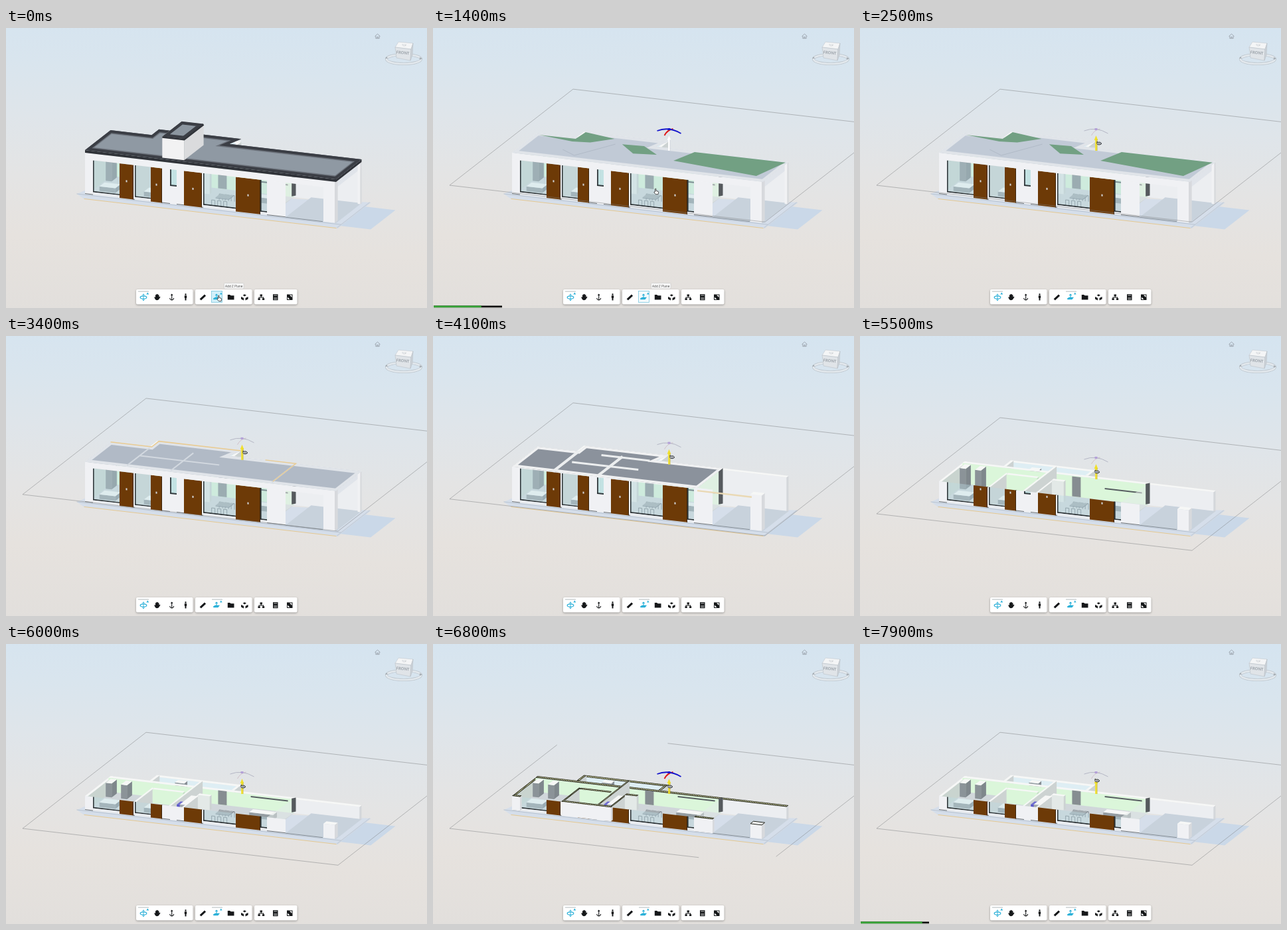
An HTML page with a canvas for the animation above (8000 ms loop, 634 by 422 pixels).

```html
<!DOCTYPE html>
<html lang="en">
<head>
<meta charset="utf-8">
<title>House section plane</title>
<style>
html, body { margin: 0; width: 634px; height: 422px; overflow: hidden; }
body {
  position: relative;
  background: linear-gradient(183deg, #d5e4f0 0%, #d9e5ee 18%, #dfe5ea 36%, #e4e4e4 56%, #e6e2de 76%, #e2dfdc 100%);
}
canvas, svg { position: absolute; left: 0; top: 0; width: 634px; height: 422px; }
text { font-family: "Open Sans", "Noto Sans", sans-serif; }
.bar { fill: #fff; filter: drop-shadow(0 1px 1.5px #0005); }
.blue { stroke: #2bb0d8; fill: none; }
.ink { fill: #16181a; }
.line { stroke: #16181a; fill: none; stroke-width: 1.1; }
</style>
</head>
<body>
<canvas id="view" width="634" height="422"></canvas>
<svg viewBox="0 0 634 422">
  <!-- view cube -->
  <path d="M555.5 12.500l4-3.500 4 3.500M556.800 12v3.700h5.400V12M558.700 15.700v-2.300h1.600v2.300" fill="none" stroke="#9aa3ac" stroke-width=".9"/>
  <ellipse cx="599" cy="47" rx="26" ry="7" fill="none" stroke="#bcc4cb" stroke-width="4"/>
  <ellipse cx="599" cy="47" rx="26" ry="7" fill="none" stroke="#e3e9ee" stroke-width="2.600"/>
  <path d="M573 43l-2 3h4zM623 44l4 2-4 2z" fill="#a5adb4"/>
  <path d="M586 29l5-8 22 2-3 9z" fill="#f4f5f6" stroke="#c2c8ce" stroke-width=".6"/>
  <path d="M586 29l24 3-1 17-21-4z" fill="#e0e4e8" stroke="#bac1c8" stroke-width=".6"/>
  <path d="M610 32l3-9-1 18-3 8z" fill="#ccd2d8" stroke="#bac1c8" stroke-width=".6"/>
  <text x="587.500" y="38.500" font-size="6" font-weight="600" fill="#8f979f" transform="rotate(5 588 38)">FRONT</text>
  <text x="596" y="27" font-size="3.600" fill="#a6adb4" transform="rotate(4 596 27)">TOP</text>

  <!-- toolbar -->
  <rect class="bar" x="196" y="394" width="85.500" height="22.500" rx="2"/>
  <rect class="bar" x="285" y="394" width="85.500" height="22.500" rx="2"/>
  <rect class="bar" x="374" y="394" width="64.500" height="22.500" rx="2"/>
  <path d="M199 397h16M310 397h16" stroke="#a9b1b5" stroke-width=".9"/>
  <rect id="hot" x="309.500" y="396.500" width="16" height="17" stroke="#7cc8e0" stroke-width=".8"/>
  <g class="blue">
    <ellipse cx="207" cy="406" rx="4.800" ry="2.200" stroke-width="1.200"/>
    <path d="M207 401v10M205.500 402.500l1.500-1.700 1.500 1.700M205.500 409.300l1.500 1.700 1.500-1.700" stroke-width=".9"/>
    <path d="M317 407v-5M315.400 403l1.600-1.700 1.600 1.700" stroke-width="1.100"/>
  </g>
  <path d="M211.300 401.500l2-3 2 3zM322 401.500l1.800-3 1.800 3zM312 407.500l3-1.800h7l-2.600 3.600h-7z" fill="#2bb0d8"/>
  <path class="ink" d="M225 406v-3.500q.7-1 1.400 0v-1.300q.7-1 1.400 0v.4q.7-.8 1.400 0v1q.8-.8 1.300 0v3l1-.8q1.200 0 .8 1l-2.300 3.500q-1 1-3 1-1.700-.2-2.300-1.600l-1.500-2.700q.6-1.300 1.800 0z"/>
  <path class="line" d="M249.700 401.500v8.500M246.700 407q.5 3 3 3t3-3M248.400 402.800l1.300-1.400 1.300 1.400"/>
  <path class="ink" d="M269.300 401.500a1.200 1.200 0 1 1 2.400 0 1.200 1.200 0 1 1-2.400 0zM268.800 403.300h3.400v3.500l-.7.300v3.400h-2v-3.400l-.7-.3z"/>
  <path class="ink" d="M291.700 408.300l7.300-6.800 2.100 2.200-7.300 6.800zM333.800 402h3.500l1.200 1.300h5v6.200h-9.700z"/>
  <path class="ink" d="M356.700 402.800l2.600-1.600 2.600 1.600-2.600 1.800zM354 405l4 2v3.500l-4-2zM364.600 405l-4 2v3.500l4-2z"/>
  <path class="ink" d="M382.500 401.500h3.500v2.700h-3.500zM379.500 407.300h3.200v2.700h-3.200zM386 407.300h3.200v2.700H386zM402 401.200h7.500v9H402zM423 401.500h8.500v8.500H423z"/>
  <path class="line" d="M384.200 404v2M381 407.500V406h6.600v1.500"/>
  <path d="M403.300 403h5M403.300 408.700h5M403.300 406.800h5" stroke="#fff" stroke-width=".7"/>
  <path d="M424 405.500v3.500h3.500zM427 402.500h3.500v3.500z" fill="#fff"/>

  <g id="tip">
    <rect x="328.500" y="384.500" width="29.500" height="8.500" rx="1" fill="#fbfbfb" stroke="#c9c9c9" stroke-width=".7"/>
    <text x="343.200" y="390.500" font-size="4.800" text-anchor="middle" fill="#444">Add Z Plane</text>
  </g>
  <g id="bar">
    <rect x="1" y="418.500" width="103" height="2.700" fill="#0b0d0b"/>
    <rect id="fill" x="1" y="418.500" height="2.700" fill="#35a535"/>
  </g>
  <path id="hand" d="M-1.500 0v-4.500q.8-1 1.500 0v3l3 .8q1 .6.600 2L3 3.700H-.5L-3.200.7q0-1.200 1.700-.7z" fill="#fff" stroke="#222" stroke-width=".8"/>
  <g id="grab" fill="none" stroke="#30343a" stroke-width="1">
    <ellipse rx="3.200" ry="2" fill="#dfe2e6"/><path d="M-4-1.500l2-1.500M0-1v2M2 1l2-1"/>
  </g>
</svg>
<script>
const $ = id => document.getElementById(id);
const g = $('view').getContext('2d');
const LOOP = 8000, TALL = 62;
const LEFT = 119, RIGHT = 497, CARPORT = 398, WING = 1.28;
const WHITE = '#f0f1f4', MINT = '#dbf6da', GREY = '#959da2', DARK = '#3b3e45';
let drop = 0, H = TALL, capped = false;

// Plan to screen: u runs along the facade, w is depth, z is height
const proj = (u, w, z = 0) => [u + 38.5 * w, 250 + (u - LEFT) * .1164 - 30 * w - z];

function trace(plan, z) {
  g.beginPath();
  for (const [u, w, up = z] of plan) g.lineTo(...proj(u, w, up));
}
function face(plan, color, z = 0) {
  trace(plan, z);
  g.fillStyle = color; g.fill();
}
function line(plan, color, width = 1, z = 0) {
  trace(plan, z);
  g.strokeStyle = color; g.lineWidth = width; g.stroke();
}
// Fill a shape and give it a border that stays inside
function edged(plan, z, fill, edge, width) {
  g.save();
  trace(plan, z); g.closePath(); g.clip();
  g.fillStyle = fill; g.fill();
  g.strokeStyle = edge; g.lineWidth = width * 2; g.stroke();
  g.restore();
}
const rect = (u, w, u2, w2) => [[u, w], [u, w2], [u2, w2], [u2, w]];
const upright = (u, w, u2, w2, low, high) => [[u, w, low], [u, w, high], [u2, w2, high], [u2, w2, low]];

// Box on the floor, cut by the section plane
function box(u, w, du, dw, color, tall = TALL, low = 0, top = '#f6f7f6') {
  const z = low > TALL ? tall : Math.min(tall, H), side = upright(u + du, w, u + du, w + dw, low, z);
  if (z <= low) return;
  face(upright(u, w, u + du, w, low, z), color);
  face(side, color);
  face(side, 'rgba(40,50,60,.12)');
  face(rect(u, w, u + du, w + dw), top, z);
}
function wall(u, w, du, dw, color = '#e3e9e7') {
  box(u, w, du, dw, color);
  if (capped) edged(rect(u, w, u + du, w + dw), H, hatch, '#20221b', .8);
}

function makeHatch() {
  const c = document.createElement('canvas'), p = c.getContext('2d');
  c.width = c.height = 3;
  p.fillStyle = '#d3d5a8'; p.fillRect(0, 0, 3, 3);
  p.fillStyle = '#77794f';
  for (let i = 0; i < 3; i++) p.fillRect(i, 2 - i, 1, 1);
  return g.createPattern(c, 'repeat');
}
const hatch = makeHatch();

function slab() {
  face(rect(506, -.1, 553, .87), '#cad8e8');
  face([[126, -.22], [108, -.04], [114, .2], [506, 1.08], [506, -.22]], '#d5deea');
  face(rect(506, -.22, 508, 1.08), '#cfd9e5');
  line([[108, -.04], [506, -.04]], '#aeb9c6', .7);
  line([[506, -.2], [506, 1.08]], '#b6c1cd', .7);
  line([[126, -.22], [506, -.22]], '#e6c687', .9);
}

function dining() {
  for (let i = 0; i < 6; i++) {
    const u = 305 + i % 3 * 9, w = i < 3 ? .42 : .12;
    line(upright(u, w, u + 5, w, 0, 9), '#747d84', .9);
  }
  box(306, .25, 20, .18, '#89929a', 9, 7.5, '#a3abb0');
}

function inside() {
  const house = rect(LEFT, 0, CARPORT, 1);
  face(house, '#d0d6da');
  // rear wing
  wall(181, 1.2, 124, .08, '#deeef4');
  box(214, 1.05, 14, .12, GREY, 28);
  wall(178, 1, 4, .28);
  wall(301, 1, 4, .28);
  // left wall and the long rear wall
  wall(LEFT, 0, 4, 1, '#dfeae4');
  wall(LEFT, .92, CARPORT - LEFT, .08, MINT);
  wall(CARPORT, .92, RIGHT - CARPORT, .08, '#eceef1');
  face(upright(284, .92, 297, .92, 0, Math.min(30, H)), '#868d91');
  face(upright(334, .9, 390, .9, 17, 19), '#565c60');
  // bedrooms
  for (const u of [124, 147]) box(u, .68, 9, .2, '#8b9398', 32);
  box(133, .2, 24, .2, GREY, 7);
  wall(193, 0, 3, .7);
  wall(196, .64, 46, .07, MINT);
  box(200, .2, 16, .2, GREY, 7);
  wall(245, 0, 3, 1.25);
  box(238, .5, 12, .15, '#5b58c9', 7, 0, '#6f6ccf');
  // kitchen and living room
  box(254, .2, 9, .45, '#a3a9ae', 18);
  wall(265, 0, 3, .68);
  wall(265, .62, 18, .07);
  dining();
  box(347, .5, 36, .15, GREY, 8);
  box(352, .25, 14, .1, GREY, 5);
  // carport
  face(upright(393, 0, CARPORT, 1, 0, H), 'rgba(228,235,234,.55)');
  face(upright(394, .94, CARPORT, 1, 0, Math.min(H, 54)), '#55595d');
  face(rect(421, 0, RIGHT, 1), '#c8d2dc');
  line([[421, 0], [477, 0]], '#858e96', 1);
}

// Facade panels: pier, glass, door, small window
const edges = [119, 131, 171, 192, 194, 218, 235, 247, 257, 268, 295, 297, 346, 383, 393, 421];
const kinds = 'pgdpgdpspdpgdgp';
function panel(u1, u2, low, high, color) {
  high = Math.min(high, H);
  if (high > low) face(upright(u1, 0, u2, 0, low, high), color);
}
const build = {
  p(a, b) {
    panel(a, b, 0, TALL, WHITE);
    panel(a, b, 0, 1, '#6a7075');
  },
  g(a, b) {
    panel(a, b, 5, 52, 'rgba(186,218,226,.4)');
    panel(a, a + 1.6, 4, 52, '#30383b');
    panel(a, b, 4, 5.6, '#262c2f');
    panel(a, b, 0, 4, '#e9ecf0');
  },
  d(a, b) {
    panel(a, b, 0, 52, '#6d3a07');
    panel(b - .6, b + 1.2, 0, 52, '#20180f');
    const m = (a + b) / 2;
    panel(m - 1, m + 1, 25, 28, '#d3d6da');
  },
  s(a, b) {
    panel(a, b, 0, 28, WHITE);
    panel(a, b, 28, 52, '#c3e2e3');
    panel(a, a + 2, 28, 52, '#3f484c');
    panel(a, b, 27, 29, '#30383b');
  }
};

function facade() {
  [...kinds].forEach((k, i) => build[k](edges[i], edges[i + 1]));
  const roofed = drop < 3;
  panel(LEFT, roofed ? RIGHT : 421, 52, TALL, WHITE);
  if (roofed) {
    face(upright(RIGHT, 0, RIGHT, 1, 53, H), '#e0e4ea');
    box(493, .95, 4, .05, '#f1f2f4');
  }
  box(478, 0, 17, .12, WHITE);
  if (capped) {
    line([...rect(478, 0, 495, .12), [478, 0]], '#20221b', 1, H);
    for (const [a, b] of [[119, 131], [193, 268], [393, 421]]) wall(a, 0, b - a, .07, WHITE);
  }
}

const wing = [[LEFT, 0], [LEFT, 1], [181, 1], [181, WING], [305, WING], [298, 1]];
const outline = end => [...wing, [end, 1], [end, 0]];

function darkRoof() {
  const top = TALL + 4;
  face(upright(LEFT, 0, RIGHT, 0, TALL, top), '#303339');
  face(upright(RIGHT, 0, RIGHT, 1, TALL, top), '#303339');
  edged(outline(RIGHT), top, '#8f99a3', '#6d737c', 5.5);
  edged(outline(RIGHT), top, 'transparent', DARK, 4);
  box(233, .06, 33, .76, '#f2f2f3', 98, top);
  edged(rect(233, .06, 266, .82), 98, '#8c96a0', DARK, 4.5);
  line([[233, .06], [266, .06], [266, .82]], '#303339', 2.5, 97);
}

const greens = [
  [[124, .92], [179, .93], [181, 1.27], [230, 1.13], [204, .85], [179, .8]],
  [[249, .93], [281, .96], [312, .65], [279, .58]],
  [[344, .47], [357, .96], [494, .96], [478, .23]]
];
function cutRoof(green) {
  edged(outline(RIGHT), H, green ? '#c1cad6' : '#b1bac6', '#e0e4e9', 4);
  if (green) {
    for (const shape of greens) face(shape, '#72a083', H);
    line([[180, .4], [205, .2], [240, .9]], '#aab4c1', .7, H);
    return;
  }
  for (const u of [180, 246, CARPORT]) line([[u, .06], [u, .94]], '#d3d9e0', 2, H);
  line([[181, .55], [300, .55]], '#d3d9e0', 2, H);
  line(wing.slice(1, 5), '#e9cb92', 1.6, H);
  line([[352, 1], [CARPORT, 1], [CARPORT, .1]], '#e9cb92', 1.4, H);
}

function ceiling() {
  edged(outline(CARPORT), H, '#8b929c', '#f0f1f2', 3.5);
  for (const u of [181, 247]) line([[u, 0], [u, 1]], '#eceeef', 4, H);
  for (const w of [.5, .95]) line([[160 + 60 * w, w], [290, w]], '#eceeef', 3, H);
  line([[CARPORT, 0], [480, 0]], '#ead9b4', 2.5, H - 4);
}

// Border of the section plane, each side drawn between two fractions
function plane(partial) {
  const c = rect(92, -1.74, 567, 3.09);
  const spans = partial ? [[0, .87], [.3, 1], [0, .91], [.21, 1]] : Array(4).fill([0, 1]);
  spans.forEach((span, i) => {
    const [a, b] = [c[i], c[(i + 1) % 4]];
    line(span.map(k => a.map((v, j) => v + (b[j] - v) * k)), 'rgba(125,127,130,.62)', .8, H);
  });
}

function gizmo(bright, yellow) {
  const stroke = (d, color, width) => {
    g.strokeStyle = color; g.lineWidth = width;
    g.stroke(new Path2D(d));
  };
  const blue = bright ? '#1616cc' : '#b4b6c4', gold = yellow ? '#f1e02a' : '#fff';
  g.save();
  g.translate(355.5, 153 + drop);
  stroke('M-7 9Q-3 1 6-1', bright ? '#e01818' : '#cfbfc8', bright ? 1.8 : 1);
  stroke('M-18 2Q0-5 18 6', blue, bright ? 1.8 : 1);
  g.fillStyle = bright ? blue : '#b3a0d8';
  g.fillRect(-2, -2, 4, 3);
  stroke('M0 14V32', gold, 2.6);
  g.fillStyle = gold;
  g.fill(new Path2D('M-2.800 16L0 9 2.800 16Z'));
  stroke('M1.600 15V32', yellow ? '#b9a70e' : '#c4cad0', .6);
  g.restore();
}

const clamp = k => Math.max(0, Math.min(1, k));
const part = (t, a, b) => clamp((t - a) / (b - a));
const within = (t, a, b) => t >= a && t < b;
const show = (id, on) => $(id).setAttribute('visibility', on ? 'visible' : 'hidden');
const place = (id, x, y) => $(id).setAttribute('transform', `translate(${x} ${y})`);

function draw(t) {
  // the drag starts slowly, then gathers speed until it stops
  drop = 41 * part(t, 3000, 6000) ** 1.55;
  if (t <= 3200) drop = 0;
  H = TALL - drop;
  const cut = t >= 800, last = t >= 7700, hover = t >= 2400;
  capped = within(t, 6500, 7700);

  g.clearRect(0, 0, 634, 422);
  slab();
  inside();
  facade();
  if (!cut) darkRoof();
  else if (drop < 4) cutRoof(within(t, 1100, 3250));
  else if (drop < 11) ceiling();
  if (cut) {
    plane(capped);
    gizmo(!hover || capped, hover);
  }

  show('tip', t < 2300);
  show('hot', t < 2300);
  $('hot').setAttribute('fill', t < 600 ? '#d3f0fa' : '#f3fafc');
  show('bar', within(t, 1000, 1700) || last);
  $('fill').setAttribute('width', 103 * (last ? .7 + .3 * part(t, 7700, 8000) : .35 + .65 * part(t, 1000, 1750)));
  show('hand', !hover);
  show('grab', hover);
  const out = part(t, 600, 1400), back = part(t, 1500, 2300);
  place('hand', 321 + 15 * out + 23 * back, 408 - 161 * out - 73 * back);
  place('grab', 360 - 3 * part(t, 4200, 5400), 174 + drop - (last ? 9 : 0));
}

function tick(now) {
  // the scene advances ten times a second
  draw(Math.floor(now % LOOP / 100) * 100);
  requestAnimationFrame(tick);
}
draw(0);
requestAnimationFrame(tick);
</script>
</body>
</html>
```
